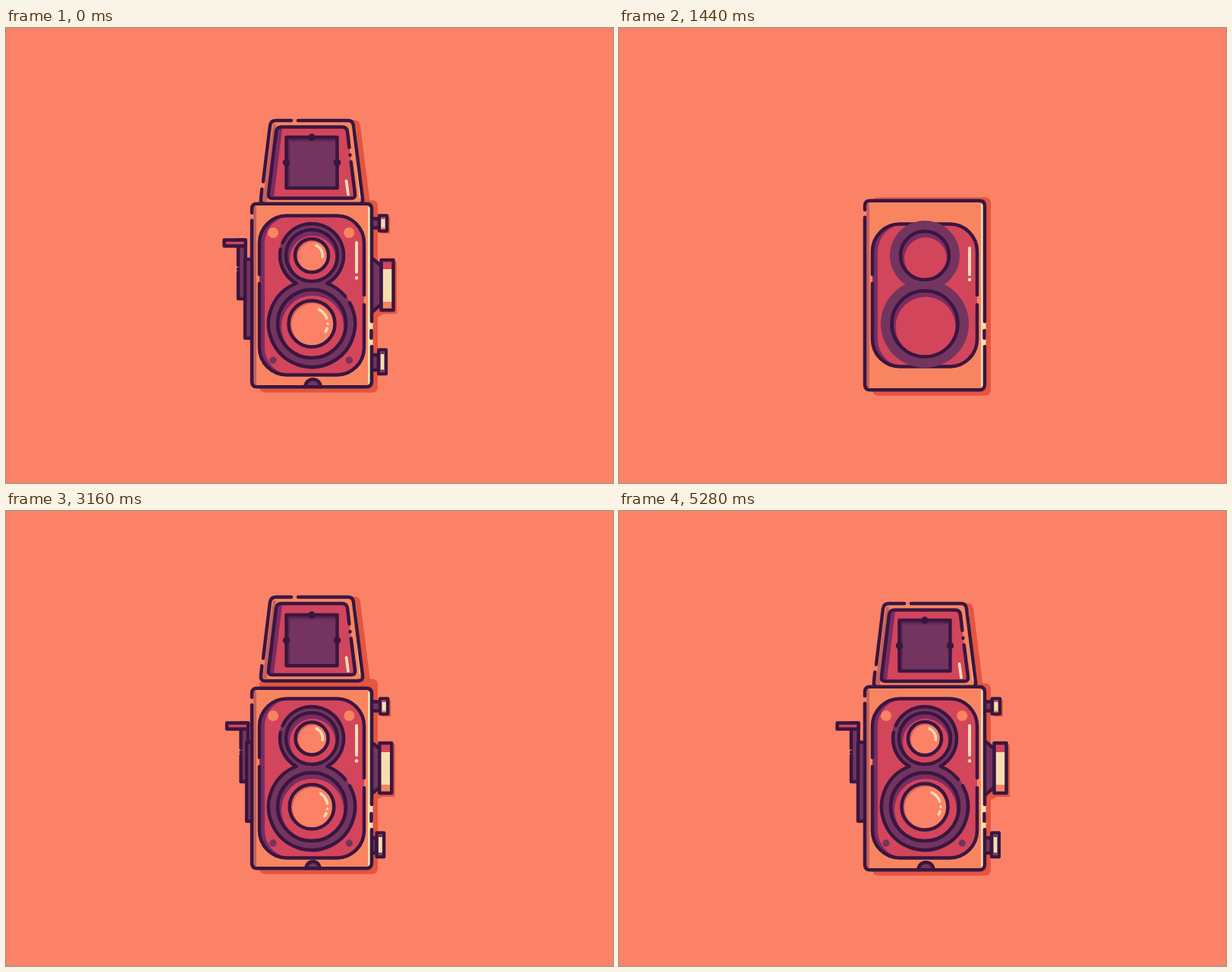
An HTML page that plays this animation: 800x600 px, repeating every 5.32 s.

```html
<!DOCTYPE html>
<html lang="en">
<head>
<meta charset="utf-8">
<title>Twin lens camera</title>
<style>
html, body { margin: 0; width: 100%; height: 100%; overflow: hidden; background: #fb8267; }
svg { display: block; width: 100vw; height: 100vh; }
</style>
</head>
<body>
<svg id="stage" viewBox="0 0 800 600"></svg>
<script>
const LOOP = 5320, STEP = 40, LAND = 520;
const BG = '#fb8267', BODY = '#f88560', RED = '#d3455b', PLUM = '#73355f',
  INK = '#391640', CREAM = '#f5deb0', SHADOW = '#e4553f', SHADE = '#7b2c63', RUST = '#c5615e';
const stage = document.getElementById('stage');

const clamp = v => Math.max(0, Math.min(1, v));
const smooth = v => v * v * (3 - 2 * v);
const mix = (a, b, p) => a + (b - a) * p;
const span = (t, a, b) => clamp((t - a) / (b - a));
const spring = (t, peak, size, period, decay) => {
  const s = (t - peak) / 1000;
  return size * Math.exp(-decay * s) * Math.cos(2 * Math.PI * s / period);
};
const hoodSpring = t => spring(t, 2970, -24, 1.015, .83);
function keys(t, ...list) {
  for (let i = 1; i < list.length; i++) {
    const [t0, a] = list[i - 1], [t1, b] = list[i];
    if (t < t1) return mix(a, b, smooth(span(t, t0, t1)));
  }
  return list[list.length - 1][1];
}

const rect = (x0, y0, x1, y1, fill, r = 0, line = 0) =>
  x1 <= x0 || y1 <= y0 ? '' :
  `<rect x="${x0}" y="${y0}" width="${x1 - x0}" height="${y1 - y0}" rx="${r}" fill="${fill}"` +
  (line ? ` stroke="${INK}" stroke-width="${line}"` : '') + '/>';
const disc = (x, y, r, fill, line = 0) => r <= 0 ? '' :
  `<circle cx="${x}" cy="${y}" r="${r}" fill="${fill}"` +
  (line ? ` stroke="${INK}" stroke-width="${line}"` : '') + '/>';
const area = (d, fill) => `<path d="${d}" fill="${fill}"/>`;
function line(d, p = 1, color = INK, width = 4.5) {
  if (p <= 0) return '';
  const trim = p < 1 ? ` pathLength="1" stroke-dasharray="${p} 2"` : '';
  return `<path d="${d}" fill="none" stroke="${color}" stroke-width="${width}"${trim}/>`;
}
const shift = (x, y, content) => `<g transform="translate(${x} ${y})">${content}</g>`;
function arc(x, y, r, from, to) {
  const at = a => `${x + r * Math.cos(a * Math.PI / 180)} ${y + r * Math.sin(a * Math.PI / 180)}`;
  return `M${at(from)}A${r} ${r} 0 0 1 ${at(to)}`;
}

// The falling disc and its two rings shrink together into the body.
function drop(t, half) {
  const time = (LAND - t) / 280;
  const ring = (u, fill, morph) => {
    const r = 79 + 280 * u ** 1.3, x = 403 + 38.5 * Math.sqrt(u);
    const fall = clamp(1 - time) ** 2, y = mix(148, 352.5, fall);
    const h = morph ? mix(r, half, fall) : r;
    return rect(x - r, y - h, x + r, y + h, fill, mix(r, 8, morph ? fall * fall : 0));
  };
  return ring(time * 1.59, RED, false) + ring(time * 1.31, PLUM, false) + ring(time, BODY, true);
}

function hood(t) {
  const rise = mix(130, hoodSpring(t), smooth(span(t, 2460, 2760)));
  const screen = rect(369.5, 143.5, 436.5, 210.5, PLUM) + rect(371, 145, 435, 149, '#5d2953') +
    rect(371, 145, 374, 209, '#5d2953') +
    line('M369.5 143.5H436.5V210.5H369.5Z') +
    disc(403, 143.5, 4.8, INK) + disc(369.5, 177, 4.8, INK) + disc(436.5, 177, 4.8, INK);
  return shift(0, rise,
    area('M356 121H459Q466 121 467 128L481 240H350Z', SHADOW) +
    area('M356 121.5H451Q457 121.5 458 128L470 225Q471 232 463 232H342Q335 232 336 225L348 128Q349 121.5 356 121.5Z', BODY) +
    area('M352 126H356L344 229H338Z', RUST) +
    line('M459 131L468 222', 1, CREAM, 4) +
    area('M363 130H444Q449 130 450 135L460 218Q461 224 455 224H351Q345 224 346 218L356 136Q357 130 363 130Z', RED) +
    area('M358 132H364L353 222H347Z', SHADE) +
    line('M448.5 201L451 219', 1, CREAM, 3.8) +
    line('M376 121.5H356Q349 121.5 348 128L339 202M337.3 212L336 225Q335 232 342 232H463Q471 232 470 225L458 128Q457 121.5 451 121.5H385') +
    line('M452.4 157L450 136Q449 130 443 130H363Q357 130 356 136L346 218Q345 224 351 224H455Q461 224 460 218L454.7 176M453.5 167v.1') +
    shift(0, -rise * .18 * (rise < 0), screen));
}

function leftSide(t) {
  const x = mix(42, spring(t, 2620, -9, 1.08, 1.7), smooth(span(t, 2190, 2390)));
  return shift(x, 0,
    rect(306, 279.5, 315.5, 357, PLUM) +
    line('M306 313V279.5H315.5V357H306V322M306 318v.1') +
    rect(287.5, 279.5, 315.5, 287.5, RED, 0, 4.5)) +
    shift(x * .6, 0, rect(315, 305, 328, 409, PLUM, 0, 4.5));
}

function rightSide(t) {
  const out = (a, b, hidden, x) => mix(hidden, x, smooth(span(t, a, b)));
  const top = out(2100, 2360, -24, spring(t, 2400, 4, .8, 1.6));
  const dial = out(2080, 2340, -36, spring(t, 2380, 6, 1.3, 1));
  const low = out(2200, 2400, -24, -7.5 * Math.exp(-(t - 2400) / 800));
  return shift(top, 0,
    rect(494, 249, 506, 271, SHADOW) + rect(478, 251.5, 492, 263.5, PLUM, 0, 4.5) +
    rect(492, 247.5, 502, 267.5, CREAM, 0, 4.5) + rect(494.2, 249.7, 499.8, 252, RED) +
    rect(494.2, 263, 499.8, 265.3, BODY)) +
  shift(dial, 0,
    area('M484 310L498 308H515V377H498L484 384Z', SHADOW) +
    area('M480 301L495 314V364L480 377Z', PLUM) + line('M483 304L495 314V364L483 374') +
    rect(494.5, 306, 510.5, 372, CREAM) + rect(496, 307, 509, 318, RED) +
    rect(496, 361, 509, 371, BODY) + line('M494.5 306H510.5V372H494.5Z')) +
  shift(low, 0,
    rect(478, 431, 491, 451, PLUM, 0, 4.5) +
    rect(491.5, 424.5, 501, 456, CREAM, 0, 4.5) + rect(493.7, 426.7, 498.8, 430, PLUM) +
    rect(493.7, 450.5, 498.8, 453.8, PLUM));
}

function body(t, half) {
  const top = 352.5 - half, base = 352.5 + half, p = smooth(span(t, 480, 860));
  const bump = keys(t, [2520, 0], [2760, 10.8], [3160, 9], [4200, 10.1]);
  const dome = `M${404.5 - bump} ${base}a${bump} ${bump} 0 0 1 ${2 * bump} 0`;
  return rect(324, top, 482, base, BODY, 7) +
    rect(326, top + 4, 330, base - 3, RUST, 1) +
    (p > 0 ? rect(477, top + 4, 480, base - 3, CREAM, 1) + rect(480, 386, 483.5, 422, CREAM) : '') +
    (bump > 0 ? area(dome + 'Z', PLUM) + line(dome) : '') +
    line(`M324 ${top + 22}V${base - 7}q0 7 7 7H475q7 0 7 -7V420`, p) +
    line('M481.5 399V409', p) +
    line(`M482 387V${top + 7}q0 -7 -7 -7H331q-7 0 -7 7V${top + 12}`, p);
}

function plate(t) {
  const h = keys(t, [660, 0], [960, 98], [1440, 94], [2400, 100.5], [3000, 105.5], [3160, 105]);
  if (h <= 0) return '';
  const top = 352.5 - h, base = 352.5 + h, r = Math.min(36, h), p = smooth(span(t, 860, 1240));
  let out = rect(334, top, 472, base, SHADE, r) + rect(341, top, 472, base, RED, r);
  if (h > 60) out +=
    line(`M334 337V${base - r}a${r} ${r} 0 0 0 ${r} ${r}H${472 - r}a${r} ${r} 0 0 0 ${r} ${-r}V365`, p) +
    line(`M472 352V${top + r}a${r} ${r} 0 0 0 ${-r} ${-r}H${334 + r}a${r} ${r} 0 0 0 ${-r} ${r}V325`, p);
  const glint = span(t, 1080, 1360), y = at => 352.5 + (at - 352.5) * h / 105;
  out += line(`M462 ${y(283)}V${y(322)}`, glint, CREAM, 4) +
    line(`M462 ${y(329.5)}v.1`, +(glint === 1), CREAM, 4.6);
  const screw = smooth(span(t, 2520, 2760));
  for (const x of [352, 452.3])
    out += disc(x, 270, 7 * screw, BODY) + disc(x, 438, 4.7 * screw, PLUM);
  return out;
}

function lenses(t) {
  const ring = (y, r) => r < 1 ? '' :
    disc(403, y, r, SHADE) + disc(404, y + 4, Math.max(0, r - 4), RED) + disc(403, y, r, 'none', 4.5);
  const glass = (y, r) => r < 1 ? '' :
    disc(403, y, r, '#d9655d') + disc(404.7, y + 1.7, Math.max(0, r - 2.4), BG) + disc(403, y, r, 'none', 4.5);
  const up = keys(t, [800, 0], [1060, 49], [1440, 46], [2000, 44]);
  const low = keys(t, [860, 0], [1120, 60], [1440, 58]);
  const ringUp = keys(t, [1000, 0], [1250, 36], [1440, 32], [1800, 36], [2400, 34]);
  const ringLow = keys(t, [960, 0], [1220, 47], [1440, 43.5], [1800, 47], [2400, 45]);
  const glassUp = keys(t, [1760, 0], [2050, 26], [2400, 23.5], [3160, 21.5], [4200, 22]);
  const glassLow = keys(t, [1800, 0], [2100, 33], [2400, 27], [2760, 32], [3160, 29.3], [4200, 30.2], [5000, 30.5]);
  const turnUp = keys(t, [1900, 140], [2400, 43], [2960, -4], [3160, 0]);
  const turnLow = keys(t, [1900, -160], [2400, -60], [2960, 12], [3160, 8], [4200, 2], [4700, 0]);
  const p = smooth(span(t, 1700, 2440));
  let out = disc(403, 300, up, PLUM) + disc(403, 390, low, PLUM) +
    line('M361.8 292A42 42 0 0 0 382.7 336.75A57 57 0 1 0 452.9 362.4', p) +
    line('M447.3 354.1A57 57 0 0 0 423.3 336.75A42 42 0 1 0 364.6 283', p) +
    ring(300, ringUp) + ring(390, ringLow) + glass(300, glassUp) + glass(390, glassLow);
  const g = span(t, 2020, 2280);
  if (g > 0) {
    const glint = (y, r, from, to) => line(arc(403, y, r, from, mix(from, to, g)), 1, CREAM, 3.6);
    out += glint(300, 14.5, turnUp - 65, turnUp + 8) +
      glint(390, 21, turnLow - 64, turnLow - 20) +
      glint(390, 21, turnLow, turnLow + .3) + glint(390, 21, turnLow + 17, turnLow + 29);
  }
  return out;
}

function draw(now) {
  // Poses advance at 25 per second; the loop opens on the finished camera.
  const t = Math.floor((now % LOOP + 2) / STEP) * STEP % LOOP || LOOP - STEP;
  const half = 121 + spring(t, 1640, 10, 1, .95);
  let out;
  if (t < LAND) out = drop(t, half);
  else {
    const cast = smooth(span(t, LAND, 660));
    const lift = t > 2700 ? Math.max(-9, Math.min(0, hoodSpring(t))) : 0;
    out = rect(334, 348 - half + lift, mix(482, 490, cast), mix(352.5 + half, 360 + half, cast), SHADOW, 7) +
      hood(t) + leftSide(t) + rightSide(t) + body(t, half) + plate(t) + lenses(t);
  }
  stage.innerHTML = rect(0, 0, 800, 600, BG) +
    `<g stroke-linecap="round" stroke-linejoin="round">${out}</g>`;
}

const start = performance.now();
function tick() {
  draw(performance.now() - start);
  requestAnimationFrame(tick);
}
tick();
</script>
</body>
</html>
```
